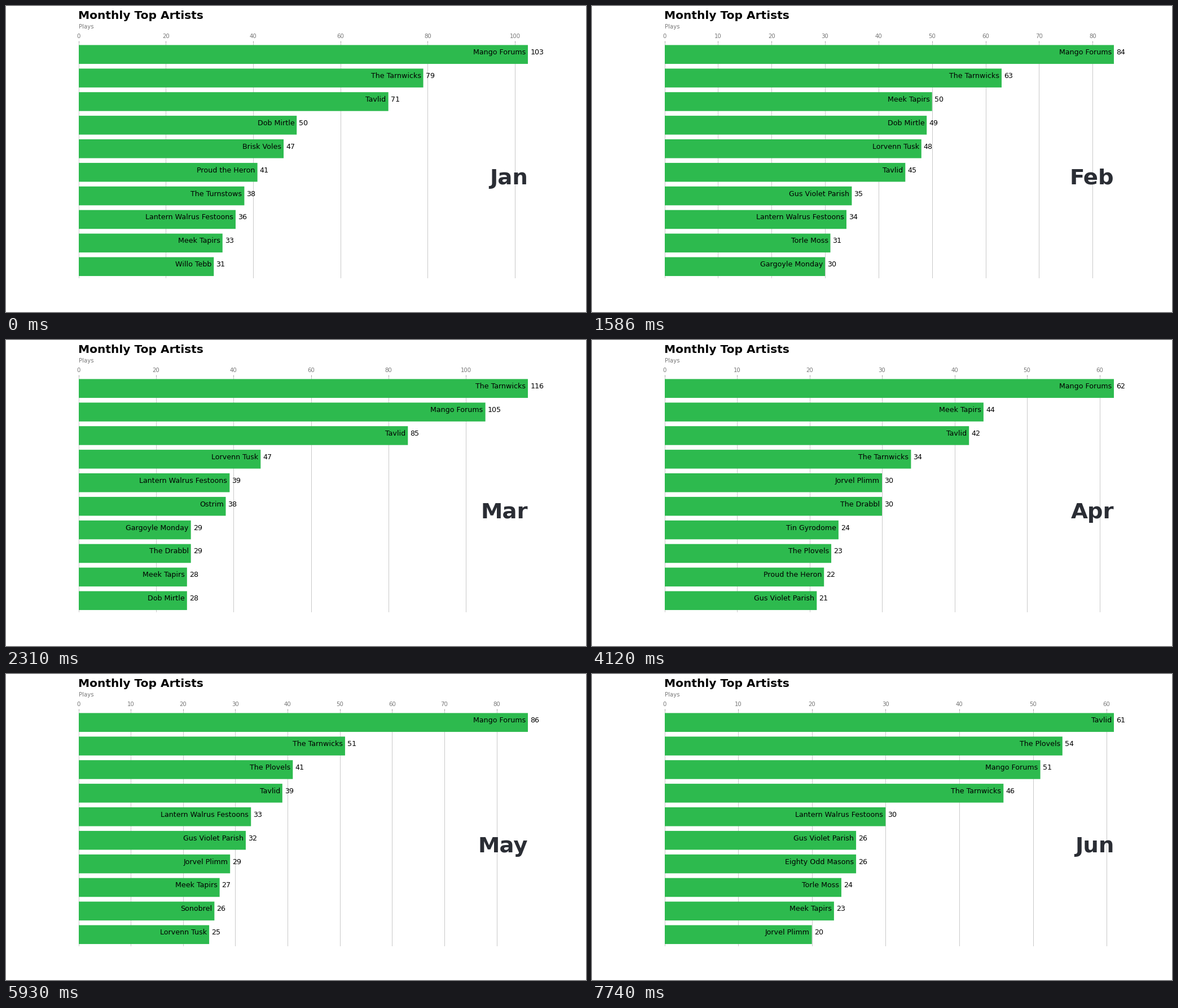
Recreate the animation shown at these times as a matplotlib script. Size 1028x544 px, loop 8 s.

```python
import matplotlib.pyplot as plt
from matplotlib.animation import FuncAnimation

WIDTH, HEIGHT = 1028, 544
INCHES = 17
DPI = WIDTH / INCHES
LOOP, STEP = 8000, 20          # ms
FIRST, HOLD = 500, 1810        # ms: first month's stay, then every later one
GREEN, GREY, INK = "#2dba4e", "#777777", "#2a2d34"

PLAYS = {
    "Jan": [("Mango Forums", 103), ("The Tarnwicks", 79), ("Tavlid", 71),
            ("Dob Mirtle", 50), ("Brisk Voles", 47), ("Proud the Heron", 41),
            ("The Turnstows", 38), ("Lantern Walrus Festoons", 36),
            ("Meek Tapirs", 33), ("Willo Tebb", 31)],
    "Feb": [("Mango Forums", 84), ("The Tarnwicks", 63), ("Meek Tapirs", 50),
            ("Dob Mirtle", 49), ("Lorvenn Tusk", 48), ("Tavlid", 45),
            ("Gus Violet Parish", 35), ("Lantern Walrus Festoons", 34),
            ("Torle Moss", 31), ("Gargoyle Monday", 30)],
    "Mar": [("The Tarnwicks", 116), ("Mango Forums", 105), ("Tavlid", 85),
            ("Lorvenn Tusk", 47), ("Lantern Walrus Festoons", 39),
            ("Ostrim", 38), ("Gargoyle Monday", 29), ("The Drabbl", 29),
            ("Meek Tapirs", 28), ("Dob Mirtle", 28)],
    "Apr": [("Mango Forums", 62), ("Meek Tapirs", 44), ("Tavlid", 42),
            ("The Tarnwicks", 34), ("Jorvel Plimm", 30), ("The Drabbl", 30),
            ("Tin Gyrodome", 24), ("The Plovels", 23),
            ("Proud the Heron", 22), ("Gus Violet Parish", 21)],
    "May": [("Mango Forums", 86), ("The Tarnwicks", 51), ("The Plovels", 41),
            ("Tavlid", 39), ("Lantern Walrus Festoons", 33),
            ("Gus Violet Parish", 32), ("Jorvel Plimm", 29),
            ("Meek Tapirs", 27), ("Sonobrel", 26), ("Lorvenn Tusk", 25)],
    "Jun": [("Tavlid", 61), ("The Plovels", 54), ("Mango Forums", 51),
            ("The Tarnwicks", 46), ("Lantern Walrus Festoons", 30),
            ("Gus Violet Parish", 26), ("Eighty Odd Masons", 26),
            ("Torle Moss", 24), ("Meek Tapirs", 23), ("Jorvel Plimm", 20)],
}
MONTHS = list(PLAYS)
ROWS = 10

plt.rcParams["font.family"] = "DejaVu Sans"
# the tiny extra keeps the pixel height from being truncated
fig, ax = plt.subplots(figsize=(INCHES, HEIGHT / DPI + 1e-9), dpi=DPI)
fig.subplots_adjust(left=0.125, right=0.9, bottom=0.11, top=0.88)

ax.set_frame_on(False)
ax.set_yticks([])
ax.set_ylim(ROWS - 0.502, -0.498)
ax.xaxis.tick_top()
ax.xaxis.set_major_formatter("{x:,.0f}")
ax.tick_params(axis="x", colors=GREY, labelsize=12)
ax.grid(axis="x", linestyle="-")
ax.set_axisbelow(True)

bars = ax.barh(range(ROWS), [1] * ROWS, height=0.8, color=GREEN, snap=False)
names = [ax.text(0, i, "", size=15, ha="right") for i in range(ROWS)]
counts = [ax.text(0, i, "", size=15, ha="left") for i in range(ROWS)]


def caption(x, y, text, **style):
    return ax.text(x, y, text, transform=ax.transAxes, **style)


caption(0, 1.10, "Monthly Top Artists", size=24, weight="bold")
caption(0, 1.06, "Plays", size=12, color=GREY)
month_label = caption(1, 0.4, "", size=46, weight="bold", color=INK, ha="right")


def month_at(ms):
    return MONTHS[max(0, int((ms - FIRST) // HOLD) + 1)]


def update(frame):
    month = month_at(frame * STEP + STEP / 2)
    top = PLAYS[month][0][1]
    gap = top / 200
    ax.set_xlim(0, top)
    month_label.set_text(month)
    for bar, name, count, (artist, plays) in zip(bars, names, counts, PLAYS[month]):
        bar.set_width(plays)
        name.set_text(artist)
        name.set_x(plays - gap)
        count.set_text(str(plays))
        count.set_x(plays + gap)
    return []


anim = FuncAnimation(fig, update, frames=LOOP // STEP, interval=STEP,
                     init_func=lambda: update(0), repeat=True, repeat_delay=0)
plt.show()
```
